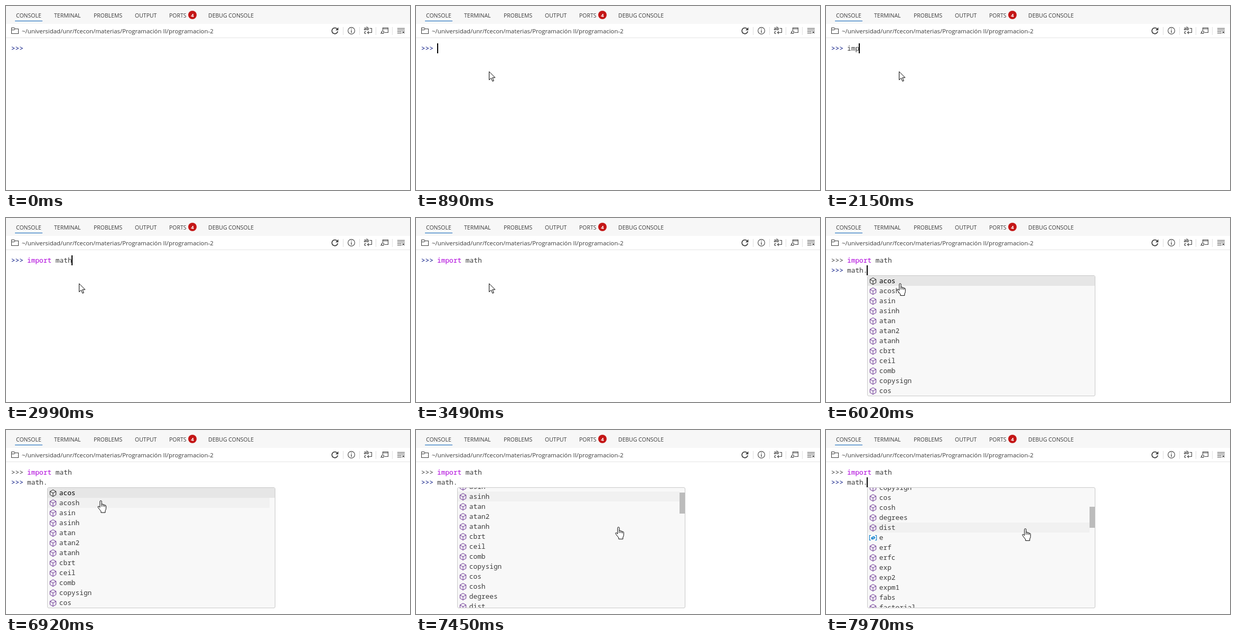
An HTML page that plays this animation: 765x350 px, repeating every 8 s.

```html
<!DOCTYPE html>
<html lang="es">
<head>
<meta charset="utf-8">
<title>Console autocomplete</title>
<style>
  html, body { margin: 0; width: 100%; height: 100%; overflow: hidden; background: #fff; }
  svg { display: block; }
  text { white-space: pre; fill: #3b3b3b; }
  .tab { font: 10.5px "Open Sans", "Noto Sans", sans-serif; }
  .path { font: 11.42px "Open Sans", "Noto Sans", sans-serif; }
  .code { font: 12.82px "Noto Sans Mono", "DejaVu Sans Mono", monospace; }
  .prompt { fill: #001080; }
  .line { fill: none; stroke: #424242; stroke-width: 1.1; }
  .cube { fill: none; stroke: #652d90; stroke-width: 1; stroke-linejoin: round; }
  .var { fill: none; stroke: #007acc; stroke-width: 1.1; }
  .box { fill: #f8f8f8; stroke: #c8c8c8; }
  .cursor { fill: #fff; stroke: #000; stroke-width: 1; stroke-linejoin: round; }
</style>
</head>
<body>
<svg id="stage" width="765" height="350" viewBox="0 0 765 350">
  <defs>
    <clipPath id="view"><rect x="79" y="110" width="430" height="228"/></clipPath>
    <path id="cube" d="M0-6.3 5.6-3.2V3.2L0 6.4-5.6 3.2V-3.2ZM-5.6-3.2 0 0 5.6-3.2M0 0V6.4"/>
    <path id="var" d="M-4-4.5H-6.6V4.5H-4M4-4.5H6.6V4.5H4M-3 0 1-2.5 3.4-1.2V1L-.6 3-3 1.8ZM-3 0-.6 1.1 3.4-1.2M-.6 1.1V3"/>
  </defs>
  <rect width="765" height="350" fill="#fff"/>
  <rect width="765" height="34" fill="#f7f7f7"/>
  <rect y="60" width="765" height="1" fill="#e5e5e5"/>
  <g id="tabs"></g>
  <rect x="17" y="28" width="52" height="1" fill="#005fb8"/>
  <circle cx="353" cy="17" r="8" fill="#c41616"/>
  <text x="353" y="20.5" text-anchor="middle" style="font:bold 9.5px 'Open Sans',sans-serif;fill:#fff">4</text>

  <path class="line" d="M10.5 52.5V41.5H15.5L17 43.5H23.5V52.5ZM10.5 45.5H15.5L17 43.5"/>
  <text class="path" x="30" y="52">~/universidad/unr/fcecon/materias/Programación II/programacion-2</text>

  <path d="M638.5 40V55M669.5 40V55M700.5 40V55M731.5 40V55" stroke="#dedede"/>
  <path class="line" style="stroke-width:1.8" d="M628.2 48.3A5.6 5.6 0 1 1 626.8 43.3"/>
  <path d="M629.4 40.6V46.2H623.8Z" fill="#424242"/>
  <circle class="line" cx="654" cy="47" r="6.4"/>
  <path class="line" d="M654 43V44.6M654 46V51" style="stroke-width:1.3"/>
  <g style="font:bold 8px 'Open Sans',sans-serif">
    <text x="677.5" y="46">ab</text><text x="678" y="53">c</text>
  </g>
  <path class="line" d="M688.5 42.5H692.5V50.5H684.5M687 48 684.5 50.5 687 53"/>
  <path class="line" d="M713.5 46.5V41.5H723.5V50.5H717M713.5 43.5H723.5M709.5 52.5 711.5 50.5"/>
  <circle class="line" cx="713.4" cy="49.8" r="2.3"/>
  <path class="line" d="M741 42.5H755M741 45.5H755M741 48.5H749M741 51.5H749M750.5 47.8 754.5 51.8M754.5 47.8 750.5 51.8"/>

  <text id="p1" class="code prompt" x="9.8" y="85">&gt;&gt;&gt;</text>
  <text id="p2" class="code prompt" x="9.8" y="104">&gt;&gt;&gt;</text>
  <text class="code" x="40" y="85"><tspan id="word"></tspan><tspan id="rest"></tspan></text>
  <text id="second" class="code" x="40" y="104"></text>

  <g id="note">
    <rect class="box" x="125.5" y="90.5" width="431" height="22" rx="2.5"/>
    <text id="noteText" class="code" x="130" y="106"></text>
  </g>
  <g id="popup">
    <rect class="box" x="78.5" y="109.5" width="431" height="229" rx="2.5"/>
    <g clip-path="url(#view)">
      <g id="list">
        <rect x="79" y="110" width="430" height="19" fill="#e6e6e6"/>
        <rect id="hover" x="79" width="420" height="19" fill="#f1f1f1"/>
      </g>
      <rect id="thumb" x="499" width="10" height="40" fill="#bcbcbc"/>
    </g>
  </g>
  <rect id="caret" width="2" height="19" fill="#000"/>
  <path id="arrow" class="cursor" d="M.5 .8V16.6L4.3 13.1 6.9 19.2 9.3 18.2 6.8 12.2H11.8Z"/>
  <g id="hand">
    <path class="cursor" d="M4.8 13.6V2.3Q4.8 .7 6.4 .7T8 2.3V8Q8 7.2 9.4 7.2 11 7.3 11 8.8 11.2 8 12.3 8.2 13.7 8.4 13.7 9.8 14 9.2 15 9.4 16.3 9.8 16.3 11.2V15.5Q16.3 18 14.8 20V23.4H6.8V21Q4.8 18.5 1.6 14.3 .3 12.3 1.4 11.5 2.6 10.9 4.8 13.6Z"/>
    <path class="cursor" d="M8 8V12M11 8.8V12M13.7 9.8V12.5"/>
  </g>
</svg>
<script>
const LOOP = 8000, ROW = 19, TOP = 110, CHAR = 7.69;
const $ = id => document.getElementById(id);
const show = (id, on) => $(id).setAttribute('visibility', on ? 'visible' : 'hidden');
const set = (id, attrs) => { for (const k in attrs) $(id).setAttribute(k, attrs[k]); };
const count = (times, t) => times.filter(x => t >= x).length;

function add(parent, tag, attrs, text = '') {
  const el = document.createElementNS('http://www.w3.org/2000/svg', tag);
  for (const k in attrs) el.setAttribute(k, attrs[k]);
  el.textContent = text;
  $(parent).append(el);
}

[['CONSOLE', 19], ['TERMINAL', 91], ['PROBLEMS', 166], ['OUTPUT', 244], ['PORTS', 309], ['DEBUG CONSOLE', 383]]
  .forEach(([name, x]) => add('tabs', 'text', { class: 'tab', x, y: 22 }, name));

('acos acosh asin asinh atan atan2 atanh cbrt ceil comb copysign cos cosh degrees dist ' +
 'e erf erfc exp exp2 expm1 fabs factorial floor').split(' ').forEach((name, i) => {
  const y = TOP + i * ROW, kind = name === 'e' ? 'var' : 'cube';
  add('list', 'use', {
    href: '#' + kind, class: kind, transform: `translate(89 ${y + 10})`,
    style: i ? '' : 'stroke:#1f1f1f'
  });
  add('list', 'text', { class: 'code', x: 100.8, y: y + 14, style: i ? '' : 'fill:#000' }, name);
});

const KEYS_1 = [1890, 1960, 2150, 2190, 2230, 2270, 2310, 2750, 2830, 2910, 2990];
const KEYS_2 = [5450, 5510, 5580, 5640, 5940];
const BLINKS = [890, 1400, 1890, 3490, 3980, 4190, 4220, 4710, 5190, 6490, 6990, 7450, 7950];
const WHEEL = [7450, 7510, 7580, 7650];
const MOVES = [
  [130, 591, 321], [430, 1, 161], [830, 138, 124], [6860, 138, 124],
  [7100, 381, 184], [7900, 381, 184], [7970, 375, 187]
];

function pointer(t) {
  const i = MOVES.findIndex(m => m[0] > t);
  if (i < 1) return MOVES[i < 0 ? MOVES.length - 1 : 0].slice(1);
  const [t0, x0, y0] = MOVES[i - 1], [t1, x1, y1] = MOVES[i];
  const u = (t - t0) / (t1 - t0), e = u * u * (3 - 2 * u);
  return [x0 + (x1 - x0) * e, y0 + (y1 - y0) * e];
}

function render(t) {
  const n1 = count(KEYS_1, t), n2 = count(KEYS_2, t);
  const line1 = 'import math'.slice(0, n1);
  $('word').textContent = line1.slice(0, 6);
  $('word').style.fill = n1 >= 6 ? '#af00db' : '';
  $('rest').textContent = line1.slice(6);
  $('second').textContent = 'math.'.slice(0, n2);
  $('p1').style.fill = t >= 4190 ? '#3b3b3b' : '';
  show('p2', t >= 4220);

  const below = t >= 4220, n = below ? n2 : n1;
  set('caret', { x: n ? Math.floor(39.5 + CHAR * n) : 40, y: below ? 90 : 71 });
  show('caret', count(BLINKS, t) % 2);

  show('note', t >= 3280 && t < 3490);
  $('noteText').textContent = t < 3310 ? 'Loading...' : 'No suggestions.';

  const [x, y] = pointer(t), open = t >= 5970, hand = t >= 6000;
  const scroll = 50 * count(WHEEL, t);
  // The hovered row only catches up once the wheel stops.
  const row = Math.floor((y - TOP + (scroll < 200 ? 0 : scroll)) / ROW);
  $('popup').style.display = open ? '' : 'none';
  set('list', { transform: `translate(0 ${-scroll})` });
  set('hover', { y: TOP + row * ROW });
  show('hover', row > 0);
  set('thumb', { y: TOP + Math.round(scroll * 0.18) });
  show('thumb', scroll);

  show('arrow', t >= 130 && !hand);
  show('hand', hand);
  set('arrow', { transform: `translate(${x} ${y})` });
  set('hand', { transform: `translate(${x - 4} ${y})` });
}

const start = performance.now();
function tick(now) {
  render(Math.max(0, now - start) % LOOP);
  requestAnimationFrame(tick);
}
render(0);
requestAnimationFrame(tick);
</script>
</body>
</html>
```
